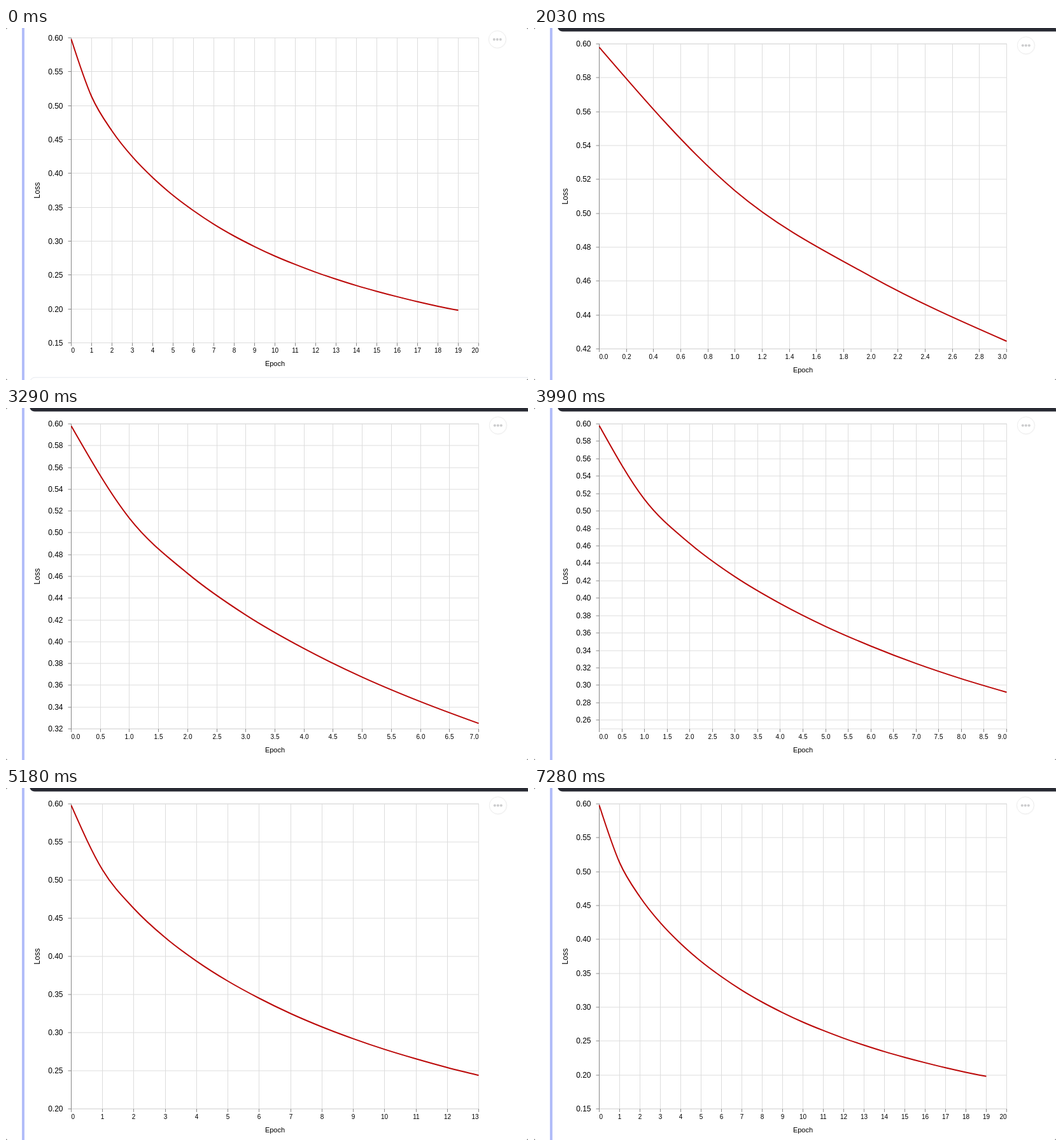
These frames come from a looping animation (820 px wide and 554 px high, 8470 ms). An HTML page:

```html
<!DOCTYPE html>
<html lang="en">
<head>
<meta charset="utf-8">
<title>Training loss</title>
<style>
  html, body { margin: 0; width: 100%; height: 100%; overflow: hidden; background: #fff; }
  svg { display: block; width: 820px; height: 554px; }
  text { font-family: "Liberation Sans", Arial, Helvetica, sans-serif; fill: #000; }
</style>
</head>
<body>
<svg id="stage" viewBox="0 0 820 554">
  <rect x="25" width="4" height="554" fill="#b2bdf9"/>
  <g id="page">
    <rect x="37" y="-40" width="800" height="45.5" rx="8" fill="#282a33"/>
    <rect id="nextCell" x="37.5" width="800" height="60" rx="8" fill="none" stroke="#e4e8ee"/>
    <g id="chart"></g>
    <g id="menu">
      <circle r="13.5" cx=".6" cy=".6" fill="none" stroke="#000" stroke-opacity=".12" stroke-width="1.5"/>
      <circle r="13.5" fill="#fff" stroke="#aaa"/>
      <g fill="#1b1e23"><circle cx="-5" r="2"/><circle r="2"/><circle cx="5" r="2"/></g>
    </g>
  </g>
  <path d="M0 0h3Q0 0 0 3zM820 0h-3Q820 0 820 3zM0 554h3Q0 554 0 551zM820 554h-3Q820 554 820 551z" fill="#555"/>
</svg>
<script>
const LOOP = 8470, W = 640, H = 480;
const losses = [0.598, 0.5133, 0.4627, 0.4245, 0.3937, 0.3675, 0.345, 0.325, 0.3075, 0.292,
  0.278, 0.2656, 0.2542, 0.244, 0.2345, 0.226, 0.2181, 0.2107, 0.204, 0.198];

// When each epoch's loss arrives, in ms
const arrivals = [910, 1260, 1680, 2030, 2380, 2730, 3010, 3290, 3640, 3990,
  4270, 4620, 4900, 5180, 5530, 5810, 6160, 6510, 6860, 7140];

const $ = id => document.getElementById(id);
const num = v => +v.toFixed(2);

function tickStep(lo, hi, count) {
  const raw = (hi - lo) / count;
  const base = 10 ** Math.floor(Math.log10(raw));
  const r = raw / base;
  return base * (r >= Math.sqrt(50) ? 10 : r >= Math.sqrt(10) ? 5 : r >= Math.sqrt(2) ? 2 : 1);
}

function nice(lo, hi) {
  for (let i = 0; i < 4; i++) {
    const s = tickStep(lo, hi, 10);
    lo = Math.floor(lo / s + 1e-6) * s;
    hi = Math.ceil(hi / s - 1e-6) * s;
  }
  return [lo, hi];
}

function ticks([lo, hi], count) {
  const s = tickStep(lo, hi, count);
  const digits = Math.max(0, -Math.floor(Math.log10(s) + 1e-6));
  const list = [];
  for (let i = Math.ceil(lo / s - 1e-6); i <= hi / s + 1e-6; i++) {
    list.push({ at: (i * s - lo) / (hi - lo), label: (i * s).toFixed(digits) });
  }
  return list;
}

// Monotone cubic through points of even spacing
function curve(pts) {
  const n = pts.length, h = pts[1][0] - pts[0][0];
  const slope = pts.slice(1).map((p, i) => (p[1] - pts[i][1]) / h);
  const tan = pts.map((_, i) => {
    if (i === 0 || i === n - 1) return 0;
    const a = slope[i - 1], b = slope[i];
    return 2 * Math.sign(a) * Math.min(Math.abs(a), Math.abs(b), Math.abs(a + b) / 4);
  });
  tan[0] = n > 2 ? (3 * slope[0] - tan[1]) / 2 : slope[0];
  tan[n - 1] = n > 2 ? (3 * slope[n - 2] - tan[n - 2]) / 2 : slope[0];
  let d = `M${pts[0].map(num)}`;
  for (let i = 1; i < n; i++) {
    const [x0, y0] = pts[i - 1], [x1, y1] = pts[i], k = h / 3;
    d += `C${[x0 + k, y0 + k * tan[i - 1], x1 - k, y1 - k * tan[i], x1, y1].map(num)}`;
  }
  return d;
}

const line = (x1, y1, x2, y2, color) =>
  `<line x1="${x1}" y1="${y1}" x2="${x2}" y2="${y2}" stroke="${color}"/>`;
const text = (x, y, size, anchor, str, extra = "") =>
  `<text x="${x}" y="${y}" font-size="${size}" text-anchor="${anchor}" ${extra}>${str}</text>`;

function axes(xs, ys) {
  let grid = "", marks = "", labels = "";
  for (const { at, label } of xs) {
    const x = Math.round(at * W);
    const flush = at < 0.001 ? "start" : at > 0.999 ? "end" : "middle";
    grid += line(x, 0, x, H, "#ddd");
    marks += line(x, H, x, H + 5, "#888");
    labels += text(x, H + 15.6, 10, flush, label);
  }
  for (const { at, label } of ys) {
    const y = Math.round((1 - at) * H);
    grid += line(0, y, W, y, "#ddd");
    marks += line(-5, y, 0, y, "#888");
    labels += text(-13, y + 4.3, 12, "end", label);
  }
  return grid + marks + line(0, 0, 0, H, "#888") + labels;
}

function plot(last) {
  let out = `<rect width="${W}" height="${H}" fill="none" stroke="#ddd"/>`;
  if (last < 0) return out + line(0, 0, 0, H, "#888");
  if (last === 0) return out + axes([{ at: 0.5, label: "0" }], [{ at: 0.5, label: "1" }]);
  const shown = losses.slice(0, last + 1);
  const xd = nice(0, last), yd = nice(shown[last], shown[0]);
  const pts = shown.map((v, i) => [i / xd[1] * W, (yd[1] - v) / (yd[1] - yd[0]) * H]);
  return out + axes(ticks(xd, W / 40), ticks(yd, H / 40)) +
    `<path d="${curve(pts)}" fill="none" stroke="#bb0808" stroke-width="2"/>`;
}

// Chart origin, title height and menu place for each stage of the run
function layout(last) {
  if (last < 0) return { x: 66.5, y: 19, title: 17.5, menu: 735, next: 534.5 };
  if (last < 3) return { x: 85.5, y: 19, title: 36.5, menu: 754, next: 553.5 };
  return { x: 102.5, y: 25, title: 36.5, menu: last < 15 ? 772.8 : 771.8, next: 559.5 };
}

function draw(last, blank) {
  const box = layout(last);
  const clipped = last === 1 || last === 2;
  const mid = box.y + H / 2;
  $("chart").innerHTML = blank ? "" :
    `<g transform="translate(${box.x} ${box.y})">${plot(last)}` +
    text(W / 2, H + box.title, 11, "middle", "Epoch") + "</g>" +
    (clipped ? "" : text(53, mid, 12, "middle", "Loss", `transform="rotate(-90 53 ${mid})"`));
  $("menu").setAttribute("transform", `translate(${box.menu} 27.4)`);
  $("menu").style.display = blank ? "none" : "";
  $("nextCell").setAttribute("y", blank ? 600 : box.next);
}

let drawn = "";
function frame(now) {
  const t = now % LOOP;
  const before = t < 490, blank = !before && t < 630;
  const last = before ? 19 : arrivals.filter(a => a <= t).length - 1;
  const key = `${last} ${blank}`;
  if (key !== drawn) draw(last, blank);
  drawn = key;
  $("page").setAttribute("transform", `translate(0 ${before ? -9.5 : 0})`);
  const hover = t > 6720 && t < 7280 ? Math.sin((t - 6720) / 560 * Math.PI) : 0;
  $("menu").setAttribute("opacity", num(0.22 + 0.25 * hover));
  requestAnimationFrame(frame);
}
frame(performance.now());
</script>
</body>
</html>
```
